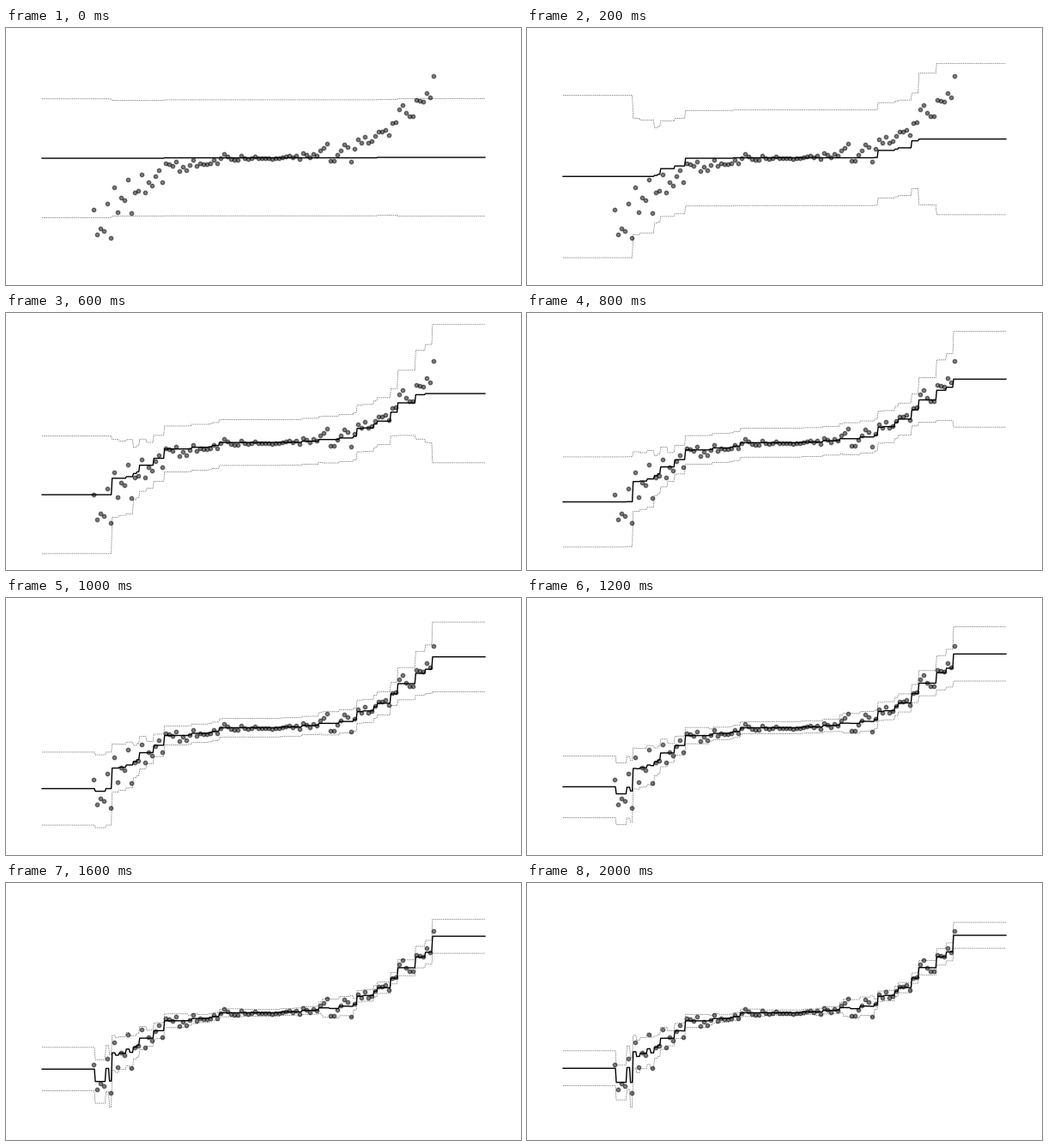
These frames come from a looping animation (600 by 300 pixels, 2100 ms). A matplotlib script:

```python
import numpy as np
import matplotlib.pyplot as plt
from matplotlib.animation import FuncAnimation

W, H, DPI = 600, 300, 100
FRAMES, INTERVAL = 21, 100
ROUNDS_PER_FRAME, CUTS, RATE = 25, 2, 0.01
FAST_ROUNDS = range(85, 400)

# cubic trend whose noise grows away from zero
N = 100
X = np.linspace(-1, 1, N)
Y = X ** 3 + 0.18 * np.abs(X) * np.random.RandomState(1).randn(N)

GRID = np.linspace(-1.3, 1.3, 500)
NEAREST = np.abs(GRID[:, None] - X).argmin(axis=1)


def to_px(x):
    return W / 2 + 258 / 1.3 * x


def to_py(y):
    return 151.7 - 84.7 * y


def best_cut(g):
    """Largest drop in squared error from one split, and its position."""
    n = len(g)
    if n < 2:
        return -1.0, 0
    k = np.arange(1, n)
    gain = (np.cumsum(g)[:-1] - k * g.mean()) ** 2 * n / (k * (n - k))
    return gain.max(), gain.argmax() + 1


def tree_fit(g):
    """Best-first regression tree over ordered samples."""
    parts = [g]
    for _ in range(CUTS):
        cuts = [best_cut(p) for p in parts]
        j = max(range(len(parts)), key=lambda i: cuts[i][0])
        parts[j:j + 1] = np.split(parts[j], [cuts[j][1]])
    return np.concatenate([np.full(len(p), p.mean()) for p in parts])


def boost(rounds):
    """Natural gradient boosting of a normal distribution."""
    mu = np.full(N, Y.mean())
    log_s = np.full(N, np.log(Y.std()))
    for r in range(rounds):
        step = RATE * (2 if r in FAST_ROUNDS else 1)
        z = (Y - mu) / np.exp(log_s)
        d_mu = tree_fit(mu - Y)
        d_s = tree_fit((1 - z ** 2) / 2)
        mu = mu - step * d_mu
        log_s = log_s - step * d_s
        yield mu, 1.96 * np.exp(log_s)


stages = list(boost(ROUNDS_PER_FRAME * (FRAMES - 1) + 1))[::ROUNDS_PER_FRAME]

fig = plt.figure(figsize=(W / DPI, H / DPI), dpi=DPI, facecolor="white")
ax = fig.add_axes([0, 0, 1, 1])
ax.set(xlim=(0, W), ylim=(H, 0))
ax.axis("off")

ax.scatter(to_px(X), to_py(Y), s=10, c="black", alpha=0.5, linewidths=1,
           zorder=1)
px = to_px(GRID)
mean_line, = ax.plot(px, px, "k-", lw=1, zorder=2)
low_line, = ax.plot(px, px, "k:", lw=0.5, zorder=2)
high_line, = ax.plot(px, px, "k:", lw=0.5, zorder=2)


def update(i):
    mu, band = (v[NEAREST] for v in stages[i])
    mean_line.set_ydata(to_py(mu))
    low_line.set_ydata(to_py(mu - band))
    high_line.set_ydata(to_py(mu + band))
    return mean_line, low_line, high_line


anim = FuncAnimation(fig, update, frames=FRAMES, interval=INTERVAL,
                     repeat=True, repeat_delay=0)
plt.show()
```
